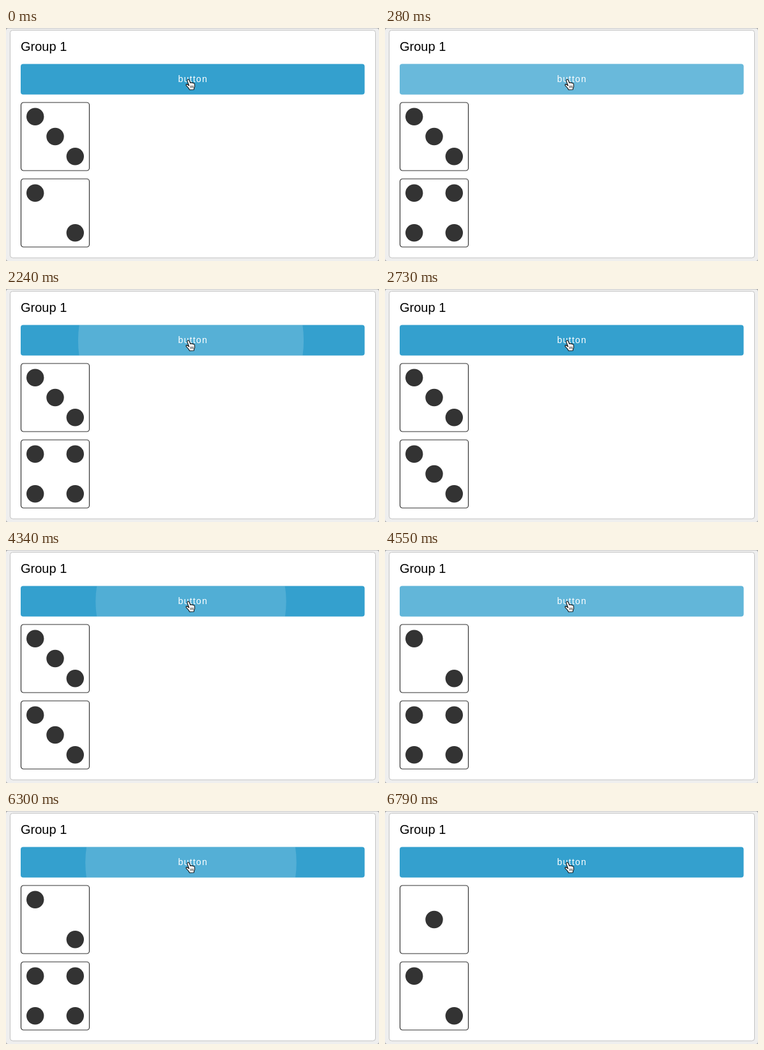
Animation, 584 px wide and 366 px high, one loop 8540 ms. Source, as an HTML page:

```html
<!DOCTYPE html>
<html lang="en">
<head>
<meta charset="utf-8">
<title>Dice group</title>
<style>
  html, body { margin: 0; width: 100%; height: 100%; overflow: hidden; background: #aaa; }
  svg { display: block; width: 584px; height: 366px; }
  text { font-family: "Liberation Sans", Arial, sans-serif; }
  .die { fill: #fff; stroke: #333; stroke-width: 1.2; }
  .pips { fill: #333; }
</style>
</head>
<body>
<svg viewBox="0 0 584 366">
  <defs>
    <clipPath id="buttonShape"><rect x="23" y="56.5" width="538.5" height="48" rx="4"/></clipPath>
  </defs>
  <rect y=".5" width="584" height="365.5" rx="4" fill="#eee"/>
  <rect x="6.5" y="3.5" width="572" height="357.5" rx="4" fill="#fff" stroke="#c2c2c2"/>
  <text x="23" y="36" font-size="20">Group 1</text>
  <g clip-path="url(#buttonShape)">
    <rect x="23" y="56" width="539" height="49" fill="#34a0ce"/>
    <circle id="ripple" cx="289.5" cy="81" r="0" fill="#fff"/>
  </g>
  <text x="269.5" y="85" font-size="14" letter-spacing="1.25" fill="#fff">button</text>
  <g transform="translate(23 116.5)"><rect class="die" x=".5" y=".5" width="107" height="107" rx="4"/><g class="pips"></g></g>
  <g transform="translate(23 236.5)"><rect class="die" x=".5" y=".5" width="107" height="107" rx="4"/><g class="pips"></g></g>
  <g stroke="#111" stroke-width="1.1" stroke-linejoin="round">
    <path fill="#fff" d="M286.6 90.6L283.9 83.2Q283.6 80.9 285.3 80.7Q286.7 80.7 287.2 82.3L288.6 86.2Q289.8 85 291 86.3Q292.3 85.4 293.2 86.7Q295 86.3 295.3 88.5Q296 92 294.4 94.6L294.2 96.8L287.4 97Q286.6 94.5 282.4 90.6Q281.3 88.8 282.8 88.4Q284.5 88.4 286.6 90.6Z"/>
    <path fill="none" stroke-width=".8" d="M289 90.5v3.5M291 90.5v3.5M293 90.5v3.5"/>
  </g>
</svg>
<script>
  const LOOP = 8540, STEP = 70, GROW = 225, FADE_END = 525;
  const RADIUS = 275, OPACITY = 0.26;
  const START_DICE = [3, 2];
  // age: how long the ripple has been running when it first appears
  const clicks = [
    { at: 140, age: 60, dice: [3, 4] },
    { at: 2240, age: 67, dice: [3, 3] },
    { at: 4340, age: 51, dice: [2, 4] },
    { at: 6300, age: 60, dice: [1, 2] }
  ];
  const LOW = 22.7, MID = 54, HIGH = 85.3;
  const diagonal = [[LOW, LOW], [HIGH, HIGH]];
  const center = [[MID, MID]];
  const faces = {
    1: center,
    2: diagonal,
    3: [...diagonal, ...center],
    4: [...diagonal, [LOW, HIGH], [HIGH, LOW]]
  };
  const ripple = document.getElementById("ripple");
  const pipGroups = document.querySelectorAll(".pips");
  let shownDice = "";

  // cubic-bezier(0, 0, 0.2, 1)
  function decelerate(x) {
    let low = 0, high = 1;
    for (let i = 0; i < 20; i++) {
      const s = (low + high) / 2;
      if (0.6 * (1 - s) * s * s + s ** 3 < x) low = s; else high = s;
    }
    return 3 * (1 - low) * low * low + low ** 3;
  }

  function showDice(dice) {
    if (shownDice === String(dice)) return;
    shownDice = String(dice);
    pipGroups.forEach((group, i) => {
      group.innerHTML = faces[dice[i]]
        .map(([x, y]) => `<circle cx="${x}" cy="${y}" r="13.7"/>`).join("");
    });
  }

  function showRipple(age) {
    const growth = decelerate(Math.min(age / GROW, 1));
    const fade = Math.min(1, Math.max(0, (FADE_END - age) / (FADE_END - GROW)));
    ripple.setAttribute("r", RADIUS * growth);
    ripple.setAttribute("opacity", OPACITY * growth * fade);
  }

  function draw() {
    const time = performance.now() % LOOP;
    let dice = START_DICE, age = FADE_END;
    for (const click of clicks) {
      if (time < click.at) break;
      const step = Math.floor((time - click.at) / STEP);
      if (step >= 1) dice = click.dice;
      age = step < 7 ? click.age + step * STEP : FADE_END;
    }
    showDice(dice);
    showRipple(age);
    requestAnimationFrame(draw);
  }
  draw();
</script>
</body>
</html>
```
